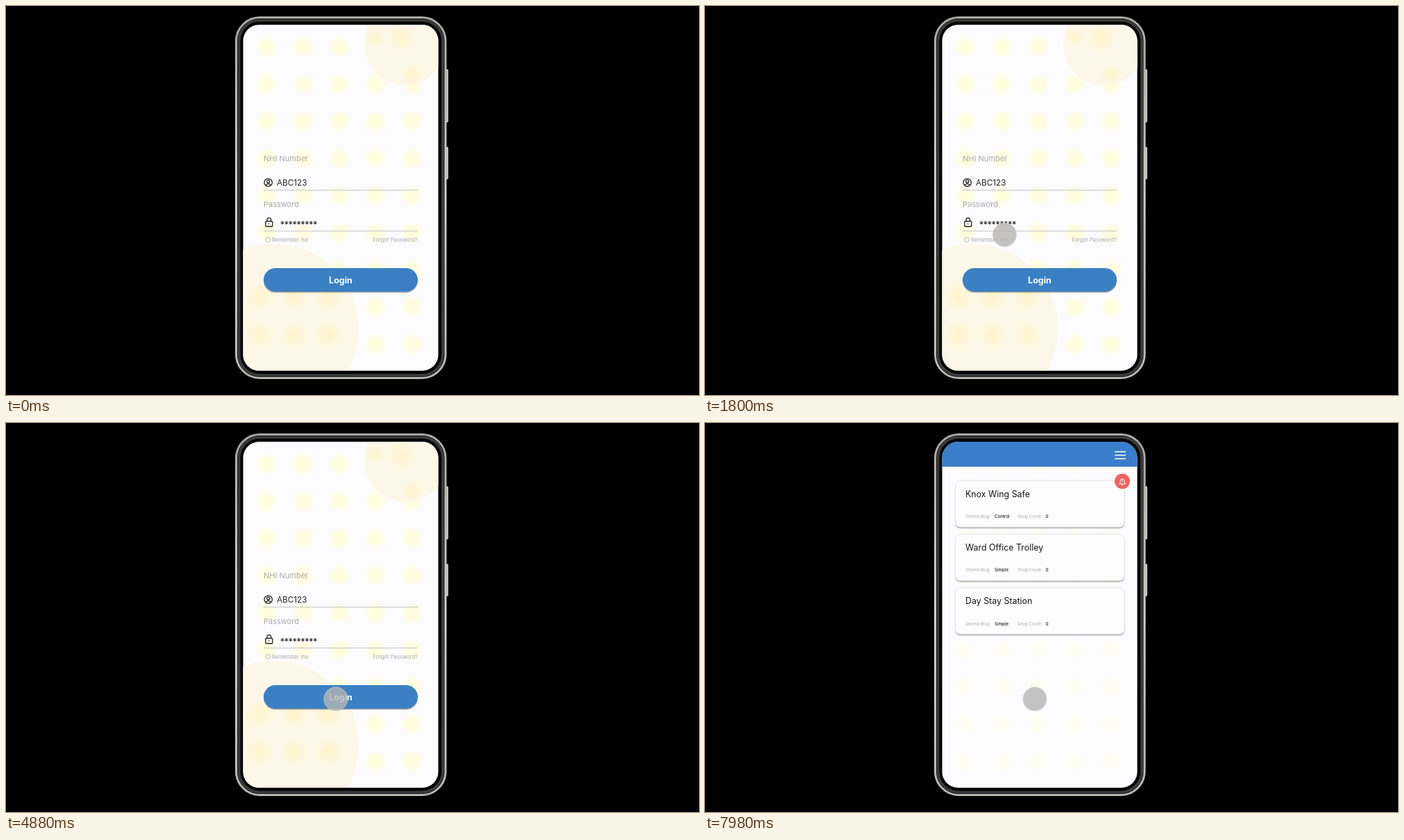
These frames come from a looping animation (998x561 px, 8 s). An HTML page:

```html
<!DOCTYPE html>
<html lang="en">
<head>
<meta charset="utf-8">
<title>Login demo</title>
<style>
  html, body { margin: 0; width: 100%; height: 100%; overflow: hidden; background: #000; }
  svg { display: block; width: 100%; height: 100%; font-family: Inter, sans-serif; }
  .label { font-size: 11px; fill: #a9a9ad; }
  .value { font-size: 11.7px; fill: #222; }
  .hint { font-size: 7.65px; fill: #a9a9ad; }
  .title { font-size: 12.4px; fill: #151515; }
  .meta { font-size: 6.2px; fill: #aaa; }
  .meta .strong { fill: #222; font-weight: 500; }
  .icon { fill: none; stroke: #222; stroke-width: 1.3; stroke-linecap: round; stroke-linejoin: round; }
  .rule { stroke: #c6c6ca; stroke-width: 1; }
</style>
</head>
<body>
<svg viewBox="0 0 998 561">
  <defs>
    <linearGradient id="metal" x2="0" y2="1">
      <stop offset="0" stop-color="#aaa9a5"/>
      <stop offset=".5" stop-color="#d0cfca"/>
      <stop offset="1" stop-color="#b8b7b2"/>
    </linearGradient>
    <radialGradient id="glow">
      <stop offset=".35" stop-color="#fffddb"/>
      <stop offset="1" stop-color="#fffddb" stop-opacity="0"/>
    </radialGradient>
    <radialGradient id="warmGlow">
      <stop offset=".2" stop-color="#fff4cd"/>
      <stop offset="1" stop-color="#fff4cd" stop-opacity="0"/>
    </radialGradient>
    <clipPath id="screen"><rect x="341.5" y="27" width="281" height="499" rx="23"/></clipPath>
    <filter id="soft" x="-20%" y="-20%" width="140%" height="160%">
      <feDropShadow dx="0" dy="1.5" stdDeviation=".7" flood-color="#555" flood-opacity=".5"/>
    </filter>
  </defs>

  <g fill="#bebdb8">
    <rect x="632" y="91" width="5" height="77" rx="2"/>
    <rect x="632" y="203" width="5" height="47" rx="2"/>
  </g>
  <rect x="331.5" y="16.5" width="301.500" height="520" rx="34" fill="#000" stroke="url(#metal)" stroke-width="3"/>
  <rect x="335.500" y="20.500" width="293.500" height="512" rx="30" fill="none" stroke="#3a3a3a" stroke-width="4"/>
  <rect x="338" y="23" width="288" height="507" rx="27"/>

  <g clip-path="url(#screen)">
    <rect x="341" y="26" width="282" height="501" fill="#fcfcfe"/>
    <g id="dots"></g>

    <g id="login">
      <g fill="#fcf7e8">
        <circle cx="575" cy="55" r="59"/>
        <circle cx="386" cy="465" r="122"/>
      </g>
      <g id="warmDots"></g>

      <text class="label" x="371" y="224">NHI Number</text>
      <g class="icon">
        <circle cx="377.700" cy="254.500" r="5.700"/>
        <circle cx="377.700" cy="252.900" r="2.100"/>
        <path d="M373.900 258.400q3.800-4 7.600 0"/>
      </g>
      <text class="value" x="390" y="258.700">ABC123</text>
      <path class="rule" d="M371 265.500H593M371 324.500H593"/>

      <text class="label" x="371" y="290">Password</text>
      <g class="icon">
        <rect x="373.800" y="310.500" width="10" height="7.500" rx="1"/>
        <path d="M376 310.500v-2a2.800 2.800 0 0 1 5.600 0v2M378.800 314v.4"/>
      </g>
      <g id="secret" class="icon" style="stroke-width:1"></g>

      <circle cx="377" cy="337" r="3.400" fill="none" stroke="#aaa" stroke-width=".8"/>
      <text class="hint" x="383" y="339.700">Remember me</text>
      <text class="hint" x="593" y="339.700" text-anchor="end">Forgot Password?</text>

      <rect x="371" y="378" width="222" height="34" rx="17" fill="#3b80c2" filter="url(#soft)"/>
      <text x="482" y="400" text-anchor="middle" font-size="12.500" font-weight="700" fill="#fff">Login</text>
    </g>

    <g id="home">
      <rect x="341" y="26" width="282" height="37" fill="#3a7dca"/>
      <path d="M590 41.500h16M590 46.500h16M590 51.500h16" stroke="#fff" stroke-width="1.700"/>
      <g id="cards"></g>
      <circle cx="601" cy="84" r="11" fill="#ef6262"/>
      <path d="M596.700 87.500c1.500-1 1.300-2.500 1.500-4.500a2.900 2.900 0 0 1 5.700 0c.2 2 0 3.500 1.500 4.500zM599.900 89.200h2.300M601 82v2.500"
            class="icon" style="stroke:#fff;stroke-width:1"/>
    </g>
  </g>

  <circle id="cursor" r="17" fill="#b6b6b6" fill-opacity=".8" stroke="#d0d0d0" stroke-width=".8"/>
</svg>

<script>
const LOOP = 8000, OPEN_HOME = 7760;
const $ = id => document.getElementById(id);

function grid(x, y, cols, rows, stepX, stepY, radius, paint) {
  let out = '';
  for (let r = 0; r < rows; r++)
    for (let c = 0; c < cols; c++)
      out += `<circle cx="${x + c * stepX}" cy="${y + r * stepY}" r="${radius}" fill="url(#${paint})"/>`;
  return out;
}

$('dots').innerHTML = grid(375, 59, 5, 9, 52.5, 53.6, 18, 'glow');
$('warmDots').innerHTML =
  grid(365, 420, 3, 2, 50, 54, 22, 'warmGlow') + grid(570, 46, 1, 1, 0, 0, 22, 'warmGlow')
  + grid(532, 46, 1, 1, 0, 0, 14, 'warmGlow') + grid(584, 98, 1, 1, 0, 0, 16, 'warmGlow');

$('secret').innerHTML = Array.from({ length: 9 }, (_, i) =>
  `<path transform="translate(${398 + i * 5.9} 312.700)" d="M0-2.200V2.200M-1.900-1.100L1.900 1.100M-1.900 1.100L1.900-1.100"/>`).join('');

const card = ([title, kind], i) => `
  <g transform="translate(0 ${i * 77.3})">
    <rect x="360.500" y="83" width="243.500" height="67" rx="7" fill="#fdfdfe" stroke="#dfdfe5" stroke-width=".8" filter="url(#soft)"/>
    <text class="title" x="375" y="106.500">${title}</text>
    <g class="meta">
      <text x="375" y="137">Stored drug:</text><text class="strong" x="417" y="137">${kind}</text>
      <text x="450.500" y="137">Drug Count:</text><text class="strong" x="490.500" y="137">0</text>
    </g>
  </g>`;
$('cards').innerHTML = [
  ['Knox Wing Safe', 'Control'], ['Ward Office Trolley', 'Simple'], ['Day Stay Station', 'Simple'],
].map(card).join('');

// Pointer stops: time, x, y
const stops = [
  [160, 875, 150], [700, 487, 274], [1000, 487, 274], [1800, 431.5, 330],
  [2500, 473, 395], [3600, 473, 395], [4000, 475, 398], [LOOP, 475, 398],
];
const ease = p => p * p * (3 - 2 * p);

function pointerAt(t) {
  const i = stops.findIndex(s => s[0] > t);
  const [t0, x0, y0] = stops[i - 1], [t1, x1, y1] = stops[i];
  const p = ease((t - t0) / (t1 - t0));
  return [x0 + (x1 - x0) * p, y0 + (y1 - y0) * p];
}

const show = (id, visible) => $(id).setAttribute('visibility', visible ? 'visible' : 'hidden');

function draw(t) {
  const home = t >= OPEN_HOME, pointing = t >= stops[0][0];
  show('login', !home);
  show('home', home);
  show('cursor', pointing);
  $('dots').setAttribute('opacity', home ? .4 : 1);
  if (pointing) $('cursor').setAttribute('transform', `translate(${pointerAt(t)})`);
}

const start = performance.now();
function tick() {
  draw((performance.now() - start) % LOOP);
  requestAnimationFrame(tick);
}
tick();
</script>
</body>
</html>
```
